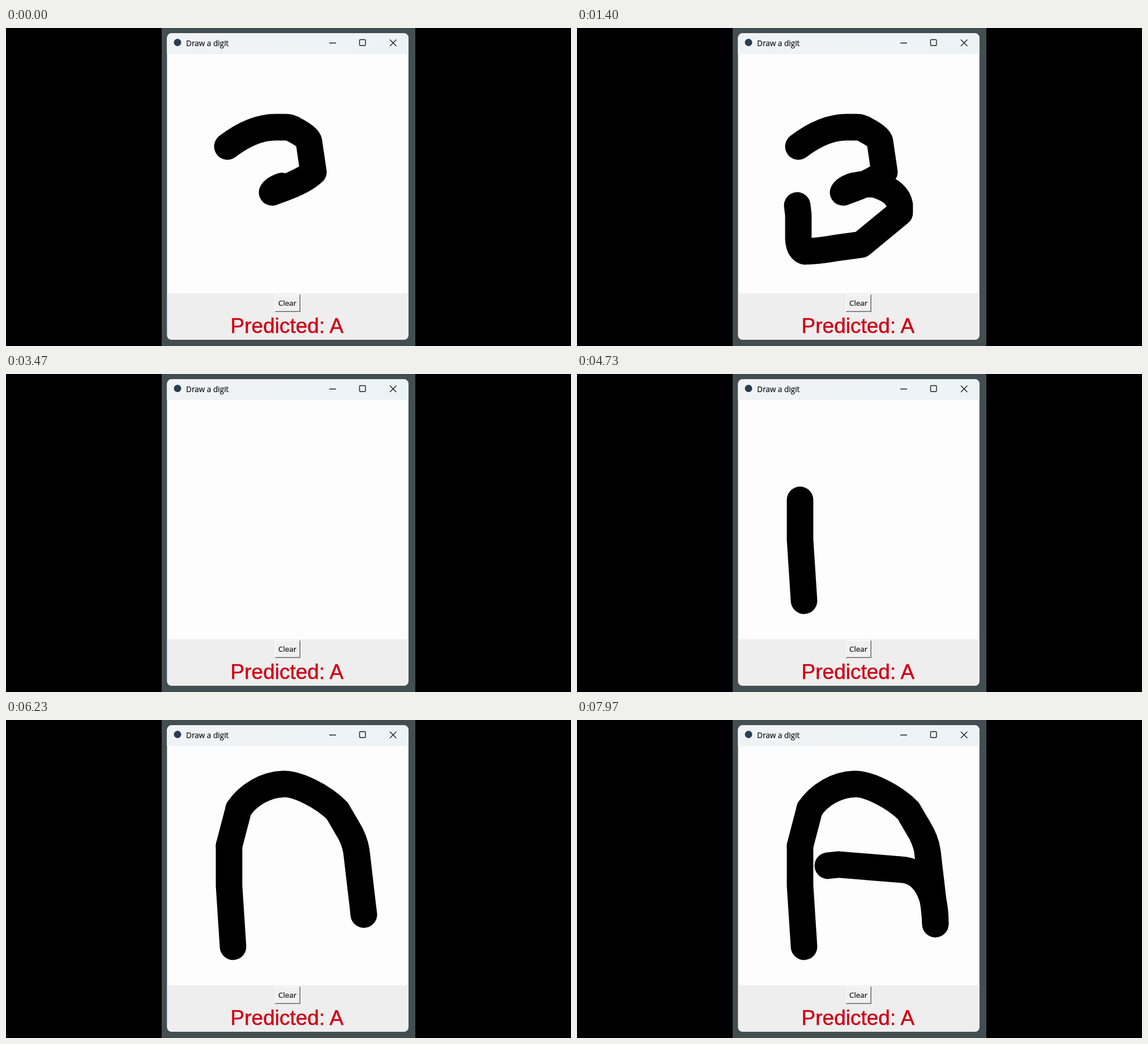
An HTML page for the animation above (8 s loop, 998 by 561 pixels).

```html
<!DOCTYPE html>
<html lang="en">
<head>
<meta charset="utf-8">
<title>Draw a digit</title>
<style>
  html, body { margin: 0; width: 100%; height: 100%; overflow: hidden; background: #000; }
  svg { display: block; width: 100%; height: 100%; }
  .ui { font-family: "Open Sans", "Noto Sans", sans-serif; fill: #111; stroke: #111; stroke-width: .2; }
  .result { font: 37px "Liberation Sans", Arial, sans-serif; fill: #cf0015; stroke: #cf0015; stroke-width: .5; }
  .icon { fill: none; stroke: #1c1c1c; stroke-width: 1.4; }
  .ink path {
    fill: none; stroke: #000; stroke-width: 46.8; stroke-linecap: round; stroke-linejoin: round;
    stroke-dasharray: 1 2; visibility: hidden;
  }
</style>
</head>
<body>
<svg viewBox="0 0 998 561">
  <defs>
    <linearGradient id="bar">
      <stop offset="0" stop-color="#f0f3f6"/>
      <stop offset="1" stop-color="#ecf3f7"/>
    </linearGradient>
    <clipPath id="frame"><rect x="284.3" y="9.3" width="426.7" height="540.7" rx="8"/></clipPath>
  </defs>
  <rect x="275" width="448" height="561" fill="#434e52"/>
  <g clip-path="url(#frame)">
    <rect x="284" y="9" width="427" height="541" fill="#eee"/>
    <rect x="284" y="9" width="427" height="37" fill="url(#bar)"/>
    <rect x="286" y="46" width="423" height="422" fill="#fdfdfd"/>
  </g>

  <circle cx="303" cy="25.5" r="6.5" fill="#2b3d55"/>
  <text class="ui" x="318" y="31.5" font-size="13.6">Draw a digit</text>
  <path class="icon" d="M571 26.5H583M678 20.5L689.5 32M689.5 20.5L678 32"/>
  <rect class="icon" x="624.5" y="20.5" width="10.5" height="10.5" rx="1.5"/>

  <!-- Pen moves: drawn between from and to, wiped at clear (ms) -->
  <g class="ink" data-clear="3000">
    <path data-from="0" data-to="0" d="M391 209C420 187 447 175 476 175H494Q503 175 510 180Q533 192 535 200L543 254C530 267 505 278 470 290Q474 283 487 279"/>
    <path data-from="0" data-to="1400" d="M487 279Q512 273 530 277Q566 289 570 312V326L502 382L458 388Q425 394 402 394Q392 390 391 372V330L389 313"/>
    <path data-from="1430" data-to="1830" d="M389 313L391 209"/>
  </g>
  <g class="ink" data-clear="8000">
    <path data-from="4030" data-to="4730" d="M401 400L394 292V222"/>
    <path data-from="4830" data-to="4830" d="M394 222L411 157"/>
    <path data-from="4830" data-to="5670" d="M411 157C428 132 458 114 490 113C515 112 560 135 585 160L602 189"/>
    <path data-from="5670" data-to="6230" d="M602 189Q616 211 619 232L632 343"/>
    <path data-from="6230" data-to="6470" d="M632 343L633 360"/>
    <path data-from="6600" data-to="7970" d="M633 360C634 300 609 266 573 264L462 255L443 257"/>
  </g>

  <rect x="475" y="470" width="45" height="31" fill="#6d6d6d"/>
  <rect x="475" y="470" width="44" height="30" fill="#fff"/>
  <rect x="476" y="471" width="43" height="29" fill="#a3a3a3"/>
  <rect x="476" y="471" width="42" height="28" fill="#f0f0f0"/>
  <text class="ui" x="481" y="490" font-size="13.4">Clear</text>
  <text class="result" x="396.6" y="538">Predicted: A</text>
</svg>
<script>
const LOOP = 8000;
const moves = [...document.querySelectorAll(".ink path")].map(path => {
  path.setAttribute("pathLength", 1);
  return {
    path,
    from: +path.dataset.from,
    to: +path.dataset.to,
    clear: +path.parentNode.dataset.clear
  };
});
const start = performance.now();

function render(now) {
  const t = Math.max(0, now - start) % LOOP;
  for (const { path, from, to, clear } of moves) {
    const done = t >= to ? 1 : (t - from) / (to - from);
    path.style.visibility = t >= from && t < clear ? "visible" : "hidden";
    path.style.strokeDashoffset = 1 - done;
  }
  requestAnimationFrame(render);
}
render(start);
</script>
</body>
</html>
```
